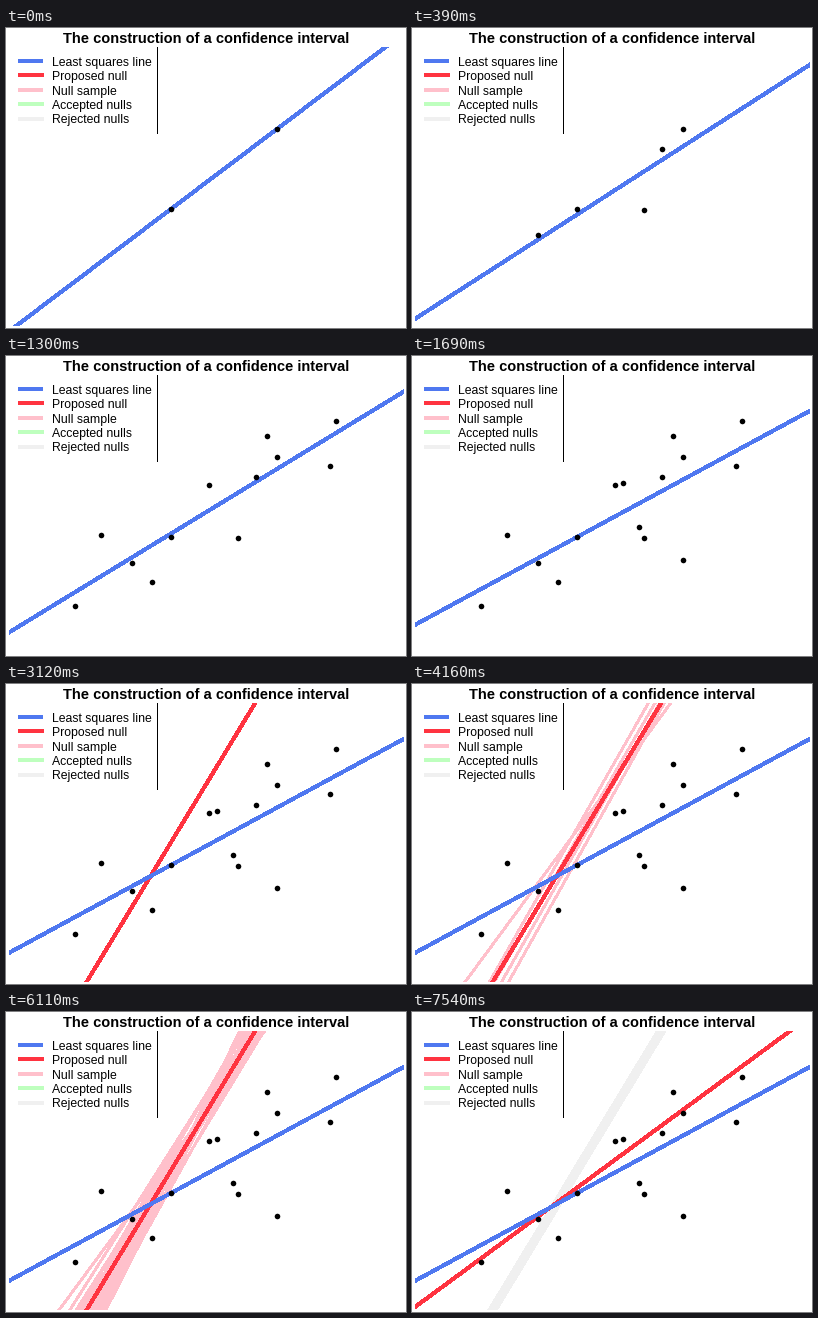
These frames come from a looping animation (400 by 300 pixels, 8000 ms). A matplotlib script:

```python
import numpy as np
import matplotlib.pyplot as plt
from matplotlib.animation import FuncAnimation
from matplotlib.patches import Rectangle

W, H, DPI = 400, 300, 100
PX = 72 / DPI          # points per pixel
LOOP, DT, STEP = 8000, 20, 130

BLUE, RED, PINK = "#4f78f0", "#ff3340", "#ffc0cb"
GREEN, GREY = "#beffbe", "#f0f0f0"
LEFT, RIGHT, TOP, BOTTOM = 3, 398, 19, 298

NULL_START, SAMPLE_START = 3120, 3640
REJECT, NEXT_NULL = 6890, 7540
N_SAMPLES = 20

# observations in order of appearance
POINTS = np.array([
    (165, 181), (271, 101), (250, 121), (126, 207), (232, 182),
    (324, 110), (95, 179), (203, 129), (146, 226), (261, 80),
    (69, 250), (330, 65), (271, 204), (211, 127), (227, 171),
])

plt.rcParams["font.family"] = "Liberation Sans"
fig = plt.figure(figsize=(W / DPI, H / DPI), dpi=DPI, facecolor="white")
ax = fig.add_axes([0, 0, 1, 1])
ax.set(xlim=(0, W), ylim=(H, 0))
ax.axis("off")
clip = Rectangle((LEFT, TOP), RIGHT - LEFT, BOTTOM - TOP, transform=ax.transData)


def line(p, q, color, width, z, cap="butt"):
    (x0, y0), (x1, y1) = p, q
    return ax.plot([x0, x1], [y0, y1], color=color, lw=width * PX, zorder=z,
                   solid_capstyle=cap, antialiased=False)[0]


def long_line(p, q, color, width, z):
    """Line through p and q, carried on past the plot region and clipped."""
    p, q = np.array(p, float), np.array(q, float)
    d = 0.1 * (q - p)
    art = line(p - d, q + d, color, width, z)
    art.set_clip_path(clip)
    return art


def sample_line(i):
    """Null sample i: its ends scatter evenly around the null, with a long left tail."""
    u = (0.115 + i * (5 ** 0.5 - 1) / 2) % 1
    v = (0.75 + i * 2 ** 0.5) % 1
    foot = 100 - 30 * u - 26 * u ** 12
    head = 232 + 27 * v
    return long_line((foot, BOTTOM), (head, TOP), PINK, 1.8, 2)


def legend_row(i, label, color, rounded):
    y = 33 + 14.4 * i
    if rounded:
        line((14, y), (36, y), color, 4, 8, "round")
    else:
        line((12, y), (37, y), color, 4, 8)
    ax.text(46, y + 4.8, label, fontsize=12.3 * PX, va="baseline", zorder=9)


ax.text(W / 2, 15, "The construction of a confidence interval",
        fontsize=14.6 * PX, weight="bold", ha="center", va="baseline")
for i, row in enumerate([
    ("Least squares line", BLUE, False),
    ("Proposed null", RED, True),
    ("Null sample", PINK, False),
    ("Accepted nulls", GREEN, True),
    ("Rejected nulls", GREY, True),
]):
    legend_row(i, *row)
line((151, TOP), (151, 105), "black", 1, 8)

NULL_1 = ((80.6, BOTTOM), (249.2, TOP))
NULL_2 = ((LEFT, 295), (378, TOP))
band = long_line(*NULL_1, GREY, 8, 1)
samples = [sample_line(i) for i in range(N_SAMPLES)]
null_1 = long_line(*NULL_1, RED, 3, 3)
null_2 = long_line(*NULL_2, RED, 3, 3)
fit = long_line((LEFT, 0), (RIGHT, 0), BLUE, 3, 4)
dots, = ax.plot([], [], "o", color="black", ms=5.6 * PX, mew=0, zorder=5,
                antialiased=False)


def draw(k):
    t = k * DT + DT // 2
    x, y = POINTS[:2 + t // STEP].T
    dots.set_data(x, y)
    ends = np.array([LEFT - 10, RIGHT + 10])
    fit.set_data(ends, np.polyval(np.polyfit(x, y, 1), ends))

    second = t >= NEXT_NULL
    shown = 0 if second else (t - SAMPLE_START) // STEP + 1
    for i, s in enumerate(samples):
        s.set_visible(i < shown)
    null_1.set_visible(NULL_START <= t < NEXT_NULL)
    null_1.set_color(GREY if t >= REJECT else RED)
    band.set_visible(second)
    null_2.set_visible(second)
    return [band, *samples, null_1, null_2, fit, dots]


anim = FuncAnimation(fig, draw, frames=LOOP // DT, interval=DT,
                     repeat=True, repeat_delay=0)
plt.show()
```
